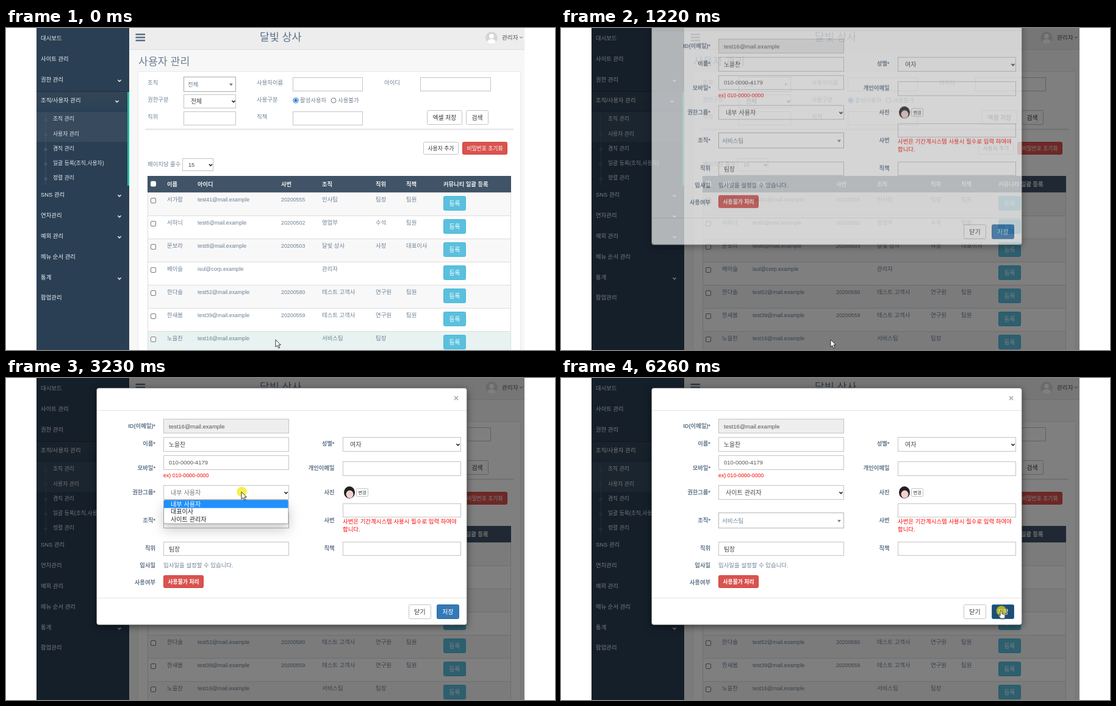
Recreate the animation shown at these times as an HTML page. Size 900 by 529 pixels, loop 7000 ms.

```html
<!DOCTYPE html>
<html lang="ko">
<head>
<meta charset="utf-8">
<title>사용자 관리</title>
<style>
html, body { margin: 0; width: 100%; height: 100%; overflow: hidden; background: #fff; }
svg { display: block; width: 900px; height: 529px; }
text { font-family: "Liberation Sans", "Noto Sans CJK KR", "Noto Sans CJK", sans-serif; white-space: pre; }

.backdrop { animation: dim 7s linear infinite; }
.modal { animation: fade 7s linear infinite, slide 7s linear infinite; }
.cursor { animation: move 7s linear infinite; }
.hover-row, .ping, .arrow, .hand, .list, .hot, .old, .new, .save { animation: 7s step-end infinite; }
.hover-row { animation-name: hoverRow; }
.ping { animation-name: ping; }
.arrow { animation-name: arrow; }
.hand { animation-name: hand; }
.list { animation-name: list; }
.hot0 { animation-name: hot0; }
.hot1 { animation-name: hot1; }
.hot2 { animation-name: hot2; }
.old { animation-name: oldRole; }
.new { animation-name: newRole; }
.save { animation-name: save; }
.list-box { filter: drop-shadow(0 10px 10px rgba(0,0,0,.2)); }
.modal-box { filter: drop-shadow(0 3px 6px rgba(0,0,0,.5)); }

@keyframes dim { 0%, 13.7% { opacity: 0 } 15.9%, 100% { opacity: .5 } }
@keyframes fade { 0%, 16% { opacity: 0 } 18.15%, 100% { opacity: 1 } }
@keyframes slide {
  0% { transform: translateY(-97px) }
  16% { transform: translateY(-97px); animation-timing-function: ease-out }
  20.3%, 100% { transform: none }
}
@keyframes move {
  0%, 31.6% { transform: translate(442px, 512px) }
  31.7% { transform: translate(445px, 506px) }
  34.7% { transform: translate(462px, 415px) }
  37.7% { transform: translate(438px, 285px) }
  41.2% { transform: translate(387px, 194px) }
  43.2%, 50% { transform: translate(386px, 187px) }
  53.5% { transform: translate(380px, 219px) }
  56.4%, 66.4% { transform: translate(372px, 233px) }
  70.1% { transform: translate(457.5px, 251px) }
  73.5% { transform: translate(594px, 306px) }
  76.8% { transform: translate(717px, 354px) }
  80.8% { transform: translate(722px, 381px) }
  82.8%, 100% { transform: translate(721.5px, 382.5px) }
}
@keyframes hoverRow { 0% { opacity: 1 } 13.6%, 100% { opacity: 0 } }
@keyframes ping {
  0% { opacity: 0 } 11.5% { opacity: .75 } 13.6% { opacity: 0 }
  46.1% { opacity: .75 } 48% { opacity: 0 }
  61.1% { opacity: .75 } 63.1% { opacity: 0 }
  89.4%, 100% { opacity: .65 }
}
@keyframes arrow { 0% { opacity: 1 } 78.8%, 100% { opacity: 0 } }
@keyframes hand { 0% { opacity: 0 } 78.8%, 100% { opacity: 1 } }
@keyframes list { 0% { opacity: 0 } 46.1% { opacity: 1 } 63.1%, 100% { opacity: 0 } }
@keyframes hot0 { 0% { opacity: 1 } 52.7%, 100% { opacity: 0 } }
@keyframes hot1 { 0% { opacity: 0 } 52.7% { opacity: 1 } 54.7%, 100% { opacity: 0 } }
@keyframes hot2 { 0% { opacity: 0 } 54.7%, 100% { opacity: 1 } }
@keyframes oldRole { 0% { fill: #444; opacity: 1 } 46.1% { fill: #777; opacity: 1 } 63.1%, 100% { opacity: 0 } }
@keyframes newRole { 0% { opacity: 0 } 63.1%, 100% { opacity: 1 } }
@keyframes save { 0% { fill: #337ab7 } 78.8% { fill: #286090 } 89.4%, 100% { fill: #204d74 } }
</style>
</head>
<body>
<svg id="stage" viewBox="0 0 900 529" xmlns="http://www.w3.org/2000/svg"></svg>
<script>
const SLATE = '#6c8096', INK = '#444', RED = '#d9534f';

// y is the vertical middle of the line
const text = (x, y, s, size = 9.4, fill = SLATE, attrs = '') =>
  `<text x="${x}" y="${y + size * .37}" font-size="${size}" fill="${fill}" ${attrs}>${s}</text>`;
const rect = (x, y, w, h, fill, attrs = '') =>
  `<rect x="${x}" y="${y}" width="${w}" height="${h}" fill="${fill}" ${attrs}/>`;
const line = (x1, y1, x2, y2, color, w = 1) =>
  `<path d="M${x1} ${y1}L${x2} ${y2}" stroke="${color}" stroke-width="${w}"/>`;
const circle = (x, y, r, fill, attrs = '') =>
  `<circle cx="${x}" cy="${y}" r="${r}" fill="${fill}" ${attrs}/>`;
const box = (x1, y1, x2, y2, fill = '#fff', stroke = '#c4c4c4', r = 0) =>
  rect(x1 + .5, y1 + .5, x2 - x1 - 1, y2 - y1 - 1, fill, `stroke="${stroke}" rx="${r}"`);
const chevron = (x, y, color = '#222', r = 2.6, w = 1.6) =>
  `<path d="M${x - r} ${y - r / 2}l${r} ${r} ${r} ${-r}" fill="none" stroke="${color}" stroke-width="${w}"/>`;
const caret = (x, y) => `<path d="M${x - 3} ${y - 1.7}h6l-3 3.6z" fill="#777"/>`;
const button = (x1, y1, x2, y2, label, size, fill = '#fff', stroke = '#c4c4c4', color = '#333', attrs = '') =>
  box(x1, y1, x2, y2, fill, stroke, 2) +
  text((x1 + x2) / 2, (y1 + y2) / 2, label, size, color, `text-anchor="middle" ${attrs}`);
const each = (list, fn) => list.map(fn).join('');

function sidebar() {
  const items = [['대시보드', 17], ['사이트 관리', 51], ['권한 관리', 85, 186], ['조직/사용자 관리', 119, 182],
    ['SNS 관리', 274, 186], ['연차관리', 308, 186], ['예외 관리', 342, 186], ['메뉴 순서 관리', 376],
    ['통계', 410, 186], ['팝업관리', 443]];
  const subs = ['조직 관리', '사용자 관리', '겸직 관리', '일괄 등록(조직,사용자)', '정렬 관리'];
  return rect(50, 0, 152, 529, '#2a3f54') +
    rect(50, 105, 149, 29, 'url(#active)') + line(50, 104.5, 199, 104.5, '#1f3142') +
    rect(50, 138, 149, 49, '#fff', 'opacity=".06"') +
    rect(199, 105, 3, 154, '#1abb9c') +
    line(65, 139, 65, 258, '#425668') +
    each(subs, (s, i) => circle(65, 151 + 24.2 * i, 2.6, '#425668') +
      text(77, 149 + 24.3 * i, s, 8.8, '#e2e6ea')) +
    each(items, ([s, y, cx]) => text(57, y, s, 9.4, '#eef0f2', 'font-weight="500"') +
      (cx ? chevron(cx, y + 1.5, '#e7e7e7') : ''));
}

function header() {
  return rect(202, 0, 648, 35, '#ededed') + line(202, 35.5, 850, 35.5, '#d9dee4') +
    each([10.5, 15.5, 20.5], y => line(212.5, y, 228, y, '#53677d', 2.4)) +
    text(416, 15, '달빛 상사', 17.3, '#5a738e') +
    `<g clip-path="url(#avatar)">${circle(796, 16, 10, '#d3d5d8')}${circle(796, 13.5, 3.8, '#fff')}` +
    `<ellipse cx="796" cy="23.5" rx="7" ry="5.5" fill="#fff"/></g>` +
    text(813, 15, '관리자', 9.6, '#515356') + chevron(844.5, 15.5, '#515356', 2.3, 1);
}

function filters() {
  const labels = [[232, 90, '조직'], [411, 90, '사용자이름'], [620, 90, '아이디'], [232, 118, '권한구분'],
    [411, 118, '사용구분'], [232, 146, '직위'], [411, 146, '직책']];
  return text(217, 55, '사용자 관리', 17.3) +
    box(216, 71, 844, 540, '#fff', '#e6e9ed') +
    each(labels, ([x, y, s]) => text(x, y, s)) +
    box(291, 80, 377, 105, '#fff', '#aaa') + text(298, 92.5, '전체') + caret(369, 93) +
    box(470, 81, 585, 104) + box(679, 81, 795, 104) +
    box(291, 109, 377, 132) + text(303, 120, '전체', 9.8, INK) + chevron(373, 120.5) +
    circle(475, 119, 4, '#fff', 'stroke="#1a73c8" stroke-width="1.2"') + circle(475, 119, 2.4, '#1a73c8') +
    text(482, 119, '활성사용자') +
    circle(537, 119, 4, '#fff', 'stroke="#777"') + text(544, 119, '사용불가') +
    box(291, 137, 377, 160) + box(470, 137, 585, 160) +
    button(690, 135, 748, 159, '엑셀 저장', 9.8) + button(754, 135, 791, 159, '검색', 9.8) +
    line(228, 166.5, 832, 166.5, '#dfe2e6', 2) +
    button(684, 187, 742, 208, '사용자 추가', 8.8) +
    button(748, 187, 822, 208, '비밀번호 초기화', 8.8, RED, '#d43f3a', '#fff') +
    text(232, 224, '페이지당 줄수') + box(289, 214, 340, 235) +
    text(299, 225, '15', 9.2, INK) + chevron(335.5, 225);
}

function table() {
  const cols = [264, 314, 451, 518, 606, 656];
  const heads = ['이름', '아이디', '사번', '조직', '직위', '직책'];
  const rows = [
    ['서가람', 'test41@mail.example', '20200555', '인사팀', '팀장', '팀원'],
    ['서하늬', 'test6@mail.example', '20200502', '영업부', '수석', '팀원'],
    ['문보라', 'test8@mail.example', '20200503', '달빛 상사', '사장', '대표이사'],
    ['배이슬', 'isul@corp.example', '', '관리자', '', ''],
    ['한다솔', 'test52@mail.example', '20200580', '테스트 고객사', '연구원', '팀원'],
    ['한새봄', 'test39@mail.example', '20200559', '테스트 고객사', '연구원', '팀원'],
    ['노을찬', 'test16@mail.example', '', '서비스팀', '팀장', '']];
  const check = (y, stroke) => box(237, y - 4.5, 246, y + 4.5, '#fff', stroke, 1.5);
  const row = (cells, i) => {
    const y = 270 + 38 * i;
    return rect(232, y, 596, 38, i % 2 ? '#fff' : '#f8f8f8') +
      (i === 6 ? rect(232, y, 596, 38, '#e8f3f1', 'class="hover-row"') : '') +
      line(232, y + .5, 828, y + .5, '#ddd') + check(y + 13.5, '#777') +
      each(cells, (s, k) => text(cols[k], y + 12, s, k === 1 || k === 2 ? 8.85 : 9.4)) +
      button(717, y + 6, 754, y + 30, '등록', 9.8, '#5bc0de', '#46b8da', '#fff');
  };
  return each(rows, row) + line(232.5, 270, 232.5, 529, '#ddd') + line(827.5, 270, 827.5, 529, '#ddd') +
    rect(232, 243, 596, 27, '#405367') + check(256, '#fff') +
    each(heads, (s, i) => text(cols[i], 256.5, s, 9.3, '#ecf0f1', 'font-weight="700"')) +
    text(717, 256.5, '커뮤니티 일괄 등록', 9.3, '#ecf0f1', 'font-weight="700"');
}

function roleList() {
  const roles = ['내부 사용자', '대표이사', '사이트 관리자'];
  return `<g class="list">${rect(258.5, 200.5, 204.5, 39, '#fff', 'class="list-box" stroke="#999" rx="2.5"')}` +
    each(roles, (s, i) => {
      const y = 207 + 12.7 * i;
      return text(270, y, s, 10.1, '#222') +
        `<g class="hot hot${i}">${rect(259, y - 6.2, 203.5, 12.8, '#1e90ff')}${text(270, y, s, 10.1, '#fff')}</g>`;
    }) + '</g>';
}

function modal() {
  const left = [['ID(이메일)*', 79], ['이름*', 108], ['모바일*', 148], ['권한그룹*', 188], ['조직*', 234],
    ['직위', 280], ['입사일', 308], ['사용여부', 336]];
  const right = [['성별*', 108], ['개인이메일', 148], ['사진', 188], ['사번', 234], ['직책', 280]];
  const labels = (list, x) => each(list, ([s, y]) =>
    text(x, y, s, 9.3, '#61758b', 'text-anchor="end" font-weight="700"'));
  const warn = 'red';
  return '<g class="modal">' +
    rect(148.5, 16.5, 607, 389, '#fff', 'class="modal-box" stroke="#555" stroke-opacity=".5" rx="4"') +
    text(738, 32.5, '×', 14.5, '#aaa', 'text-anchor="middle" font-weight="700"') +
    line(149, 53.5, 755, 53.5, '#e5e5e5') + line(149, 361.5, 755, 361.5, '#e5e5e5') +
    labels(left, 245) + labels(right, 538.5) +
    box(258, 67, 464, 91, '#eee') + text(267, 79.5, 'test16@mail.example', 9.5, '#555') +
    box(258, 97, 464, 121) + text(267, 109, '노을찬', 9.8, INK) +
    box(258, 127, 464, 151) + text(267, 139, '010-0000-4179', 9.45, '#555') +
    text(258, 160, 'ex) 010-0000-0000', 8.8, warn) +
    box(258, 176, 464, 200) + chevron(459, 188.5) +
    text(270, 188, '내부 사용자', 10.1, INK, 'class="old"') +
    text(270, 188, '사이트 관리자', 10.1, INK, 'class="new"') +
    box(258, 221, 464, 247, '#fff', '#b4b4b4') + text(264, 234, '서비스팀', 9.6) + caret(456, 235) +
    box(258, 269, 464, 292) + text(267, 281, '팀장', 9.8, INK) +
    text(258, 307.5, '입사일을 설정할 수 있습니다.', 9.45) +
    button(258, 324, 324, 345, '사용불가 처리', 8.8, RED, '#d43f3a', '#fff', 'font-weight="700"') +
    box(552, 97, 746, 121) + text(564, 109, '여자', 10, INK) + chevron(741, 109.5) +
    box(552, 137, 746, 161) +
    '<ellipse cx="563" cy="188" rx="9" ry="10" fill="#231f22"/><ellipse cx="563.5" cy="191" rx="6" ry="6.5" fill="#f0d3cf"/>' +
    button(574, 181, 594, 195, '변경', 7.2) +
    box(552, 206, 746, 229) +
    text(552, 235.5, '사번은 기간계시스템 사용시 필수로 입력 하여야', 9.45, warn) + text(552, 248.5, '합니다.', 9.45, warn) +
    box(552, 269, 746, 292) +
    button(660, 372, 697, 396, '닫기', 10) +
    rect(706.5, 372.5, 36, 23, '#337ab7', 'class="save" stroke="#2e6da4" rx="2"') +
    text(724.5, 384, '저장', 10, '#fff', 'text-anchor="middle" font-weight="500"') +
    roleList() + '</g>';
}

const cursor = () => '<g class="cursor">' + circle(.5, 0, 8.3, '#f5e916', 'class="ping"') +
  '<g fill="#fff" stroke="#222" stroke-width=".9" stroke-linejoin="round">' +
  '<path class="arrow" d="M0 0V12L2.8 9.4 4.8 14 6.8 13.2 4.9 8.7H8.4Z"/>' +
  '<path class="hand" d="M-1.4 1.4A1.4 1.4 0 0 1 1.4 1.4V5L5.6 6.1Q6.8 6.5 6.6 8L5.8 12.8H-.6L-3.8 8.4Q-4 6.8-2.6 7.1L-1.4 8Z"/>' +
  '</g></g>';

document.getElementById('stage').innerHTML =
  '<defs><linearGradient id="active" x2="0" y2="1"><stop stop-color="#334556"/><stop offset="1" stop-color="#2c4257"/></linearGradient>' +
  '<clipPath id="avatar"><circle cx="796" cy="16" r="10"/></clipPath></defs>' +
  rect(50, 0, 800, 529, '#f7f7f7') + filters() + table() + header() + sidebar() +
  rect(50, 0, 800, 529, '#000', 'class="backdrop"') + modal() + cursor();
</script>
</body>
</html>
```
